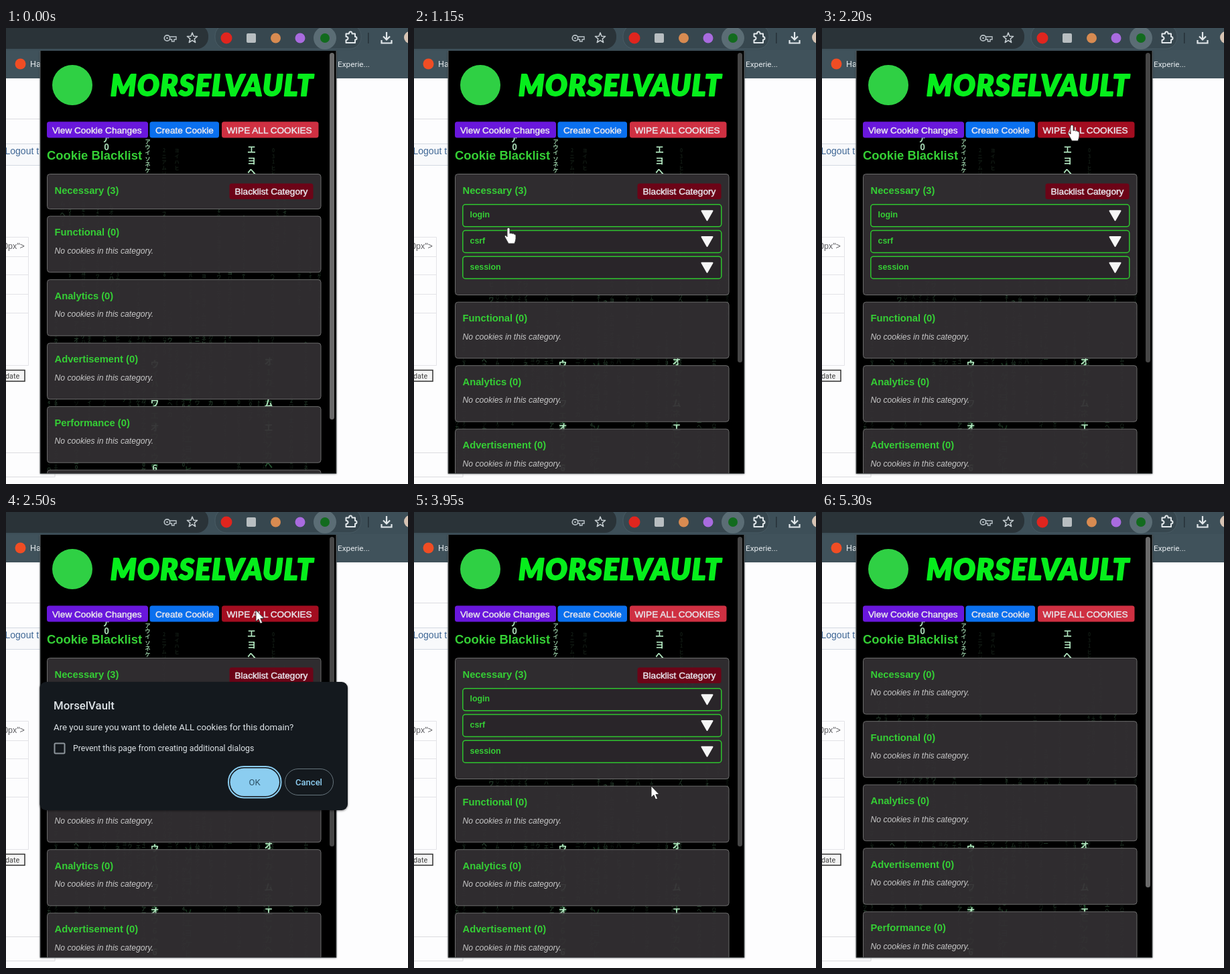
Recreate the animation shown at these times as an HTML page. Size 600 by 679 pixels, loop 5.55 s.

```html
<!DOCTYPE html>
<html lang="en">
<head>
<meta charset="utf-8">
<title>Cookie manager demo</title>
<style>
html, body { margin: 0; width: 100%; height: 100%; overflow: hidden; background: #fdfdfe; }
svg { display: block; width: 600px; height: 679px; }
text { white-space: pre; }
.arial { font-family: "Liberation Sans", Arial, sans-serif; }
.ui { font-family: Roboto, "Open Sans", sans-serif; }
.logo { font: italic 900 43px Lato, sans-serif; letter-spacing: 1.6px; stroke: #06ee1c; stroke-width: 2px; stroke-linejoin: round; }
.rain { font-family: "Noto Sans CJK JP", "Noto Sans CJK", sans-serif; font-weight: 900; }
.head { font-weight: 700; font-size: 14.75px; fill: #35cf35; }
.note { font-style: italic; font-size: 12.15px; fill: #c8c8c8; }
.btn { font-size: 13.6px; fill: #e8e6ec; stroke: #e8e6ec; stroke-width: .45px; }
.row { font-weight: 700; font-size: 12.4px; fill: #35cf35; }
</style>
</head>
<body>
<svg id="stage" viewBox="0 0 600 679">
  <defs>
    <clipPath id="popupClip"><rect x="51" y="34" width="442" height="629"/></clipPath>
    <filter id="shade" x="-10%" y="-10%" width="120%" height="120%" color-interpolation-filters="sRGB">
      <feDropShadow dx="0" dy="1" stdDeviation="1.5" flood-opacity=".5"/>
    </filter>
  </defs>
  <g id="page"></g>
  <g id="chrome"></g>
  <rect x="51" y="34" width="442" height="629" fill="#000" filter="url(#shade)"/>
  <g id="popup" clip-path="url(#popupClip)"></g>
  <path d="M51 34V663.5H493V34" fill="none" stroke="#5d6264"/>
  <g id="dialog"></g>
  <g id="pointer"></g>
</svg>
<script>
const LOOP = 5550, STEP = 50;
const byId = id => document.getElementById(id);

function add(parent, tag, attrs, content) {
  const el = document.createElementNS("http://www.w3.org/2000/svg", tag);
  for (const k in attrs) el.setAttribute(k, attrs[k]);
  if (content !== undefined) el.textContent = content;
  parent.append(el);
  return el;
}
const rect = (p, x, y, width, height, fill, more) => add(p, "rect", { x, y, width, height, fill, ...more });
const dot = (p, cx, cy, r, fill, more) => add(p, "circle", { cx, cy, r, fill, ...more });
const path = (p, d, stroke, more) => add(p, "path", { d, stroke, fill: "none", ...more });
const label = (p, x, y, cls, str, more) => add(p, "text", { x, y, class: cls, ...more }, str);

function drawPage(p) {
  rect(p, 0, 75, 600, 604, "#fdfdfe");
  path(p, "M0 135.5H51M0 632.5H51M0 668.5H73V664", "#dcdce0");
  path(p, "M0 172.5H51M0 204.5H51", "#d3d9e2");
  rect(p, 0, 173, 51, 31, "#f8f9fb");
  label(p, -1.5, 188, "arial", "Logout t", { "font-size": 14, fill: "#3f6795" });
  path(p, "M0 311.5H33.5V502.5H0M0 340.5H33M0 367.5H33M0 396.5H33M0 424.5H33", "#e3e3e7");
  label(p, -4, 329, "arial", "0px\">", { "font-size": 12.5, fill: "#5e5e62" });
  rect(p, -5, 509.5, 33, 16.5, "#f4f4f4", { stroke: "#333", "stroke-width": 1.5 });
  label(p, -1, 522, "ui", "date", { "font-size": 10.8, fill: "#444" });
}

function drawChrome(p) {
  rect(p, 0, 0, 600, 75, "#3d4f58");
  rect(p, -20, -5, 322, 36, "#2a3338", { rx: 17 });
  rect(p, 312, -5, 218, 36, "#37474f", { rx: 17, stroke: "#495b64" });
  rect(p, 0, 33, 600, 42, "#40525b");

  dot(p, 240.5, 15, 4.2, "none", { stroke: "#b9c2c7", "stroke-width": 1.7 });
  dot(p, 240.5, 15, 1.3, "#b9c2c7");
  path(p, "M244.5 13H254V17H251V20H247.5V17H244.5", "#b9c2c7", { "stroke-width": 1.4 });
  let star = "";
  for (let i = 0; i < 10; i++) {
    const a = i * Math.PI / 5, r = i % 2 ? 3.4 : 8;
    star += (i ? "L" : "M") + (278 + r * Math.sin(a)).toFixed(1) + " " + (15 - r * Math.cos(a)).toFixed(1);
  }
  path(p, star + "Z", "#c6ced2", { "stroke-width": 1.5, "stroke-linejoin": "round" });

  dot(p, 329, 15, 8.5, "#e0251e");
  rect(p, 359, 8, 14, 14, "#b8bec1", { rx: 2 });
  dot(p, 402.5, 15, 7.5, "#d88b51");
  dot(p, 439, 15, 7.5, "#a96bdf");
  dot(p, 476, 15, 17, "#5b6d75");
  dot(p, 476, 15, 7, "#126b1e");
  path(p, "M507.5 8.5H512Q512 5.5 514.3 5.5T516.5 8.5H521V13Q523.5 13 523.5 15.2T521 17.5V22H507.5V18Q510.5 17.5 510.5 15.3T507.5 12.7Z",
    "#e2e8eb", { "stroke-width": 2, "stroke-linejoin": "round" });
  rect(p, 540, 7, 1.6, 16, "#27333a");
  path(p, "M568 6V17M563 12.5L568 17.5L573 12.5M560.5 18V22.5H575.5V18", "#e2e8eb", { "stroke-width": 2.2 });
  dot(p, 603, 14, 9, "#d7c4b4");

  dot(p, 21.5, 53.5, 8, "#f04d24");
  label(p, 36, 58, "ui", "Ha", { "font-size": 12.5, fill: "#e6ecef" });
  label(p, 495, 58, "ui", "Experie...", { "font-size": 11.8, fill: "#e6ecef" });
}

// Falling-code backdrop: a few bright glyphs over dim seeded columns
function drawRain(p) {
  const kana = "アウイソネケエヨヘオムワニフハヒカ012346";
  let seed = 41;
  const rnd = () => (seed = seed * 16807 % 2147483647) / 2147483647;
  const glyph = (x, y, size, ch, fill, opacity) => label(p, x, y, "rain", ch,
    { "font-size": size, fill, opacity, "text-anchor": "middle" });
  const pick = () => kana[Math.floor(rnd() * kana.length)];

  for (let i = 0; i < 41; i++) {
    const x = 64 + i * 10 + rnd() * 4, size = 5 + rnd() * 3;
    const top = 230 + rnd() * 330, end = top + 60 + rnd() * 200;
    for (let y = top; y < Math.min(end, 664); y += size)
      glyph(x, y, size, pick(), "#5f9a70", (.1 + rnd() * .35).toFixed(2));
  }
  for (const [x, top, end] of [[236, 185, 300], [399, 185, 245], [255, 185, 215]])
    for (let y = top; y < end; y += 8.5) glyph(x, y, 7, pick(), "#4b7455", .25);
  [..."アウイソネケ"].forEach((ch, i) => glyph(211.5, 171.5 + i * 8.7, 8, ch, "#a4dcb2", .9));
  for (const [x, top] of [[222, 504], [392, 501], [272, 508]])
    for (let y = top; y < 664; y += 15.5)
      glyph(x, y, 12, pick(), "#4da763", x === 272 ? .3 : .5);
  const bright = [[366.5, 185, "エ"], [366.5, 202, "ヨ"], [366.5, 218, "ヘ"], [150, 169, "ア"], [150, 182, "0"],
    [392, 501, "オ"], [222, 505, "ウ"], [222, 563, "ワ"], [392, 563, "ム"], [222, 660, "6"], [392, 599, "エ"], [222, 599, "オ"]];
  for (const [x, y, ch] of bright) glyph(x, y, 13, ch, "#b9f0c8", .95);
}

function button(p, x, y, w, h, fill, str, tx, ty) {
  const box = rect(p, x, y, w, h, fill, { rx: 3.5 });
  label(p, tx, ty, "arial btn", str);
  return box;
}

const NAMES = ["Functional", "Analytics", "Advertisement", "Performance", "Other"];
function panel(p, y, h, title) {
  rect(p, 61.5, y, 408.5, h, "#322f32", { "fill-opacity": .95, rx: 4, stroke: "#6c6c6c" });
  return label(p, 72.5, y + 29, "arial head", title);
}

// Cookie list with the first panel closed, open or emptied
function drawList(p, count, firstHeight, thumbEnd) {
  const g = add(p, "g", {}), top = 217.5;
  const head = panel(g, top, firstHeight, `Necessary (${count})`);
  const note = y => label(g, 72.5, y + 55.7, "arial note", "No cookies in this category.");
  if (count) button(g, 333.5, 231.5, 125, 23.5, "#6c0417", "Blacklist Category", 341.5, 247.6);
  else note(top);
  if (firstHeight > 100) ["login", "csrf", "session"].forEach((name, i) => {
    const y = 262.8 + i * 38.7;
    rect(g, 72.8, y, 386, 33, "#292529", { rx: 4, stroke: "#2fc42f", "stroke-width": 1.5 });
    label(g, 83.5, y + 19.6, "arial row", name);
    path(g, `M429.5 ${y + 9.5}H445.5L437.5 ${y + 23.5}Z`, "#f6f6f6",
      { fill: "#f6f6f6", "stroke-width": 2, "stroke-linejoin": "round" });
  });
  NAMES.forEach((name, i) => {
    const y = top + firstHeight + 10.7 + i * 94.5;
    if (y > 663) return;
    panel(g, y, 83.5, name + " (0)");
    note(y);
  });
  const thumb = rect(g, 483, 37, 7, thumbEnd - 37, "#6a6a6a", { rx: 3.5 });
  return { g, head, thumb };
}

function drawDialog(p) {
  rect(p, 50.5, 253, 459.5, 191, "#14191e", { rx: 9, filter: "url(#shade)" });
  label(p, 71, 294, "ui", "MorselVault", { "font-size": 16.8, "font-weight": 500, fill: "#dde3e7" });
  label(p, 71, 324.5, "ui", "Are you sure you want to delete ALL cookies for this domain?", { "font-size": 13.26, fill: "#dde3e7" });
  rect(p, 72.5, 344.5, 15, 15, "none", { rx: 1.5, stroke: "#8c949a", "stroke-width": 2 });
  label(p, 100, 356, "ui", "Prevent this page from creating additional dialogs", { "font-size": 12.26, fill: "#dde3e7" });
  rect(p, 332, 379, 78.5, 46.5, "none", { rx: 23, stroke: "#8bcdf0", "stroke-width": 2 });
  rect(p, 334.5, 381.5, 73.5, 41.5, "#8bcdf0", { rx: 20.7 });
  label(p, 371, 407, "ui", "OK", { "font-size": 13, fill: "#2e5368", "text-anchor": "middle" });
  rect(p, 416.5, 382.5, 72, 39, "none", { rx: 19.5, stroke: "#66747c" });
  label(p, 452, 407, "ui", "Cancel", { "font-size": 13, "font-weight": 500, fill: "#8fd0f4", "text-anchor": "middle" });
}

drawPage(byId("page"));
drawChrome(byId("chrome"));
const popup = byId("popup");
drawRain(popup);
dot(popup, 99, 85, 30, "#2fd044");
label(popup, 156, 100.5, "logo", "MORSELVAULT", { fill: "#06ee1c" });
button(popup, 61, 139.5, 151, 24, "#6917dc", "View Cookie Changes", 69, 156.6);
button(popup, 214.5, 139.5, 103.5, 24, "#0a70ee", "Create Cookie", 223, 156.6);
const wipe = button(popup, 322, 139.5, 144.5, 24, "#cf3042", "WIPE ALL COOKIES", 329.5, 156.6);
label(popup, 61, 196, "arial", "Cookie Blacklist", { "font-size": 18.4, "font-weight": 700, fill: "#35cf35" });
const lists = [drawList(popup, 3, 52, 583), drawList(popup, 3, 180, 498), drawList(popup, 0, 83.5, 559)];
const dialog = byId("dialog");
drawDialog(dialog);

const pointer = byId("pointer");
const skin = { fill: "#fff", "stroke-width": .9, "stroke-linejoin": "round" };
const arrow = path(pointer, "M0 0V17L4 13.5L6.6 20L9.6 18.8L6.9 12.6H12Z", "#222", skin);
const hand = path(pointer, "M-2 2Q0-1.5 2 2V9Q4 7.5 5.4 9.2Q7.5 8 8.6 10.2Q11 9.5 11 12V17Q10.6 20 9 24H0Q-2.6 19-5 15Q-6.5 11.5-3.6 12L-2 14Z", "#333", skin);

// time, x, y of the pointer tip
const MOVES = [
  [250, 590, 340], [400, 470, 310], [600, 190, 258], [750, 153, 246], [900, 153, 246],
  [1150, 141, 297], [1450, 150, 340], [1700, 190, 330], [2050, 365, 150], [2200, 373, 144],
  [2500, 373, 146], [2950, 348, 330], [3250, 352, 364], [3550, 358, 402], [3700, 354, 408],
  [4350, 354, 408], [4650, 395, 415], [4850, 484, 425], [4900, 558, 440]
];
function tipAt(t) {
  const i = MOVES.findIndex(m => m[0] > t);
  if (i < 1) return null;
  const [t0, x0, y0] = MOVES[i - 1], [t1, x1, y1] = MOVES[i];
  const k = (t - t0) / (t1 - t0), e = k * k * (3 - 2 * k);
  return [x0 + (x1 - x0) * e, y0 + (y1 - y0) * e];
}
const show = (el, on) => el.setAttribute("display", on ? "inline" : "none");
const within = (t, a, b) => t >= a && t < b;

function render(now) {
  const t = Math.floor(now % LOOP / STEP) * STEP;
  const state = t < 900 ? 0 : t < 4300 ? 1 : 2;
  const tip = tipAt(t);
  const inside = tip && tip[0] < 493;
  lists.forEach((list, i) => {
    show(list.g, i === state);
    list.head.style.fill = within(t, 650, 1000) ? "#e04a3c" : "";
    list.thumb.setAttribute("fill", inside ? "#464646" : "#6a6a6a");
  });
  wipe.setAttribute("fill", within(t, 2050, 3750) ? "#a30d20" : "#cf3042");
  show(dialog, within(t, 2350, 3750));
  show(pointer, tip);
  if (tip) {
    pointer.setAttribute("transform", `translate(${tip[0].toFixed(1)} ${tip[1].toFixed(1)})`);
    const pointing = within(t, 650, 1700) || within(t, 2050, 2350);
    show(hand, pointing);
    show(arrow, !pointing);
  }
}
const start = performance.now();
function tick() {
  render(performance.now() - start);
  requestAnimationFrame(tick);
}
tick();
</script>
</body>
</html>
```
